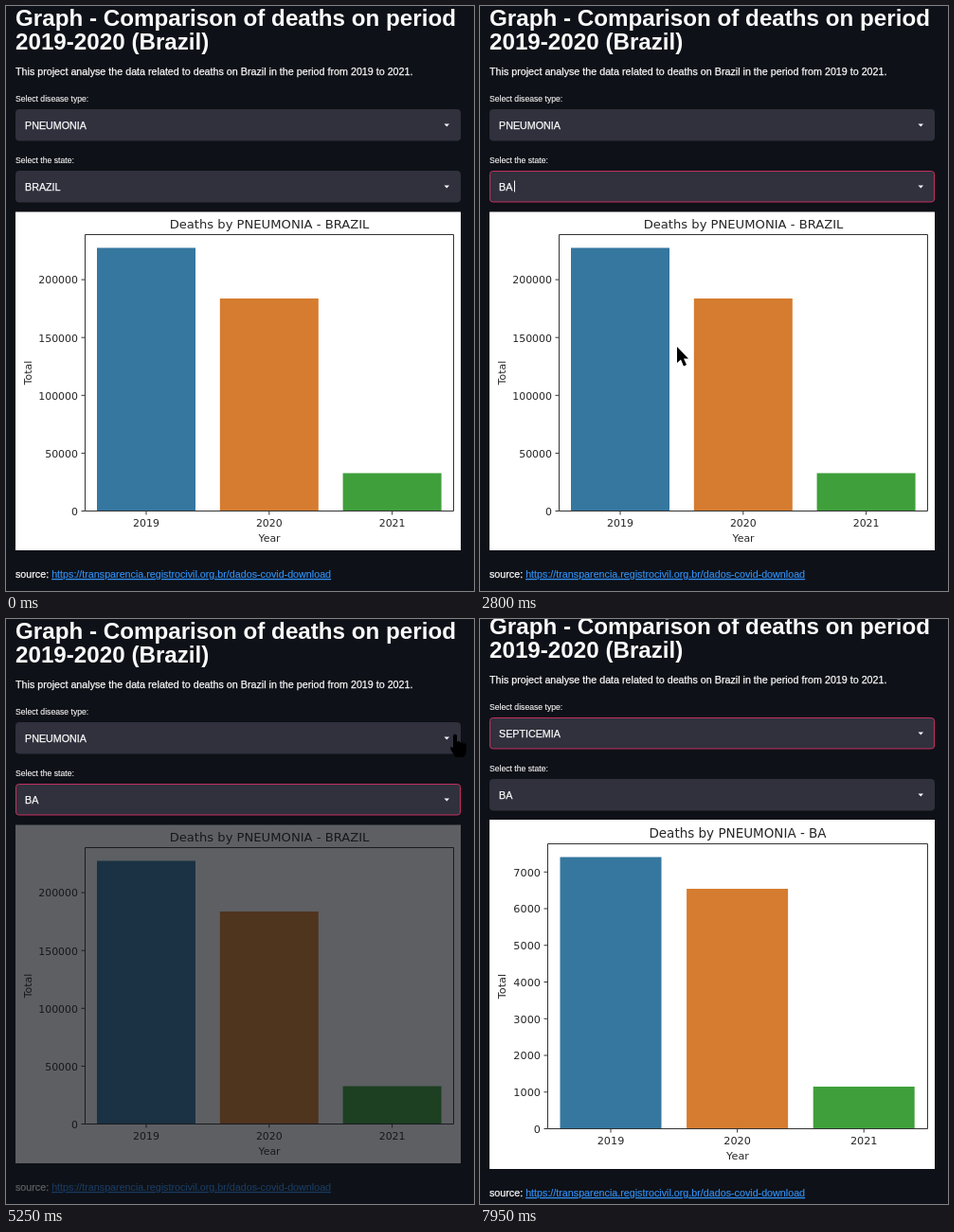
Animation, 494 px wide and 618 px high, one loop 8000 ms. Source, as an HTML page:

```html
<!DOCTYPE html>
<html lang="en">
<head>
<meta charset="utf-8">
<title>Comparison of deaths</title>
<style>
html, body { margin: 0; width: 100%; height: 100%; overflow: hidden; background: #0e1117; }
svg { display: block; width: 494px; height: 618px; }
.ui { font-family: "Liberation Sans", Arial, sans-serif; font-size: 10.73px; fill: #fafafa; }
.ui text { stroke: #fafafa; stroke-width: .25px; }
.ui .title { font-size: 24.2px; font-weight: bold; stroke: none; }
.ui .label { font-size: 8.63px; stroke-width: .1px; }
.ui .link { fill: #3391f5; stroke: #3391f5; stroke-width: .15px; text-decoration: underline; }
.plot { font-family: "DejaVu Sans", sans-serif; fill: #262626; }
.axis { fill: none; stroke: #333; stroke-width: 1; }
</style>
</head>
<body>
<svg viewBox="0 0 494 618">
  <g id="page" class="ui">
    <text class="title" x="10" y="21">Graph - Comparison of deaths on period</text>
    <text class="title" x="10" y="46">2019-2020 (Brazil)</text>
    <text x="10" y="73">This project analyse the data related to deaths on Brazil in the period from 2019 to 2021.</text>
    <text class="label" x="10" y="101">Select disease type:</text>
    <g id="disease" transform="translate(10 109)"></g>
    <text class="label" x="10" y="165.5">Select the state:</text>
    <g id="state" transform="translate(10 174)"></g>
  </g>
  <g id="result">
    <g id="country" class="plot"></g>
    <g id="region" class="plot"></g>
    <g id="source" class="ui">
      <text x="10" y="604">source: <tspan class="link">https://transparencia.registrocivil.org.br/dados-covid-download</tspan></text>
    </g>
  </g>
  <g id="cursor">
    <path id="arrow" d="M0 0V17L4 13.5L7 20.5L10 19L7 12.5H12Z"/>
    <path id="hand" d="M-2 1Q0-2 2 1V8Q4 6 5.5 8.5Q8 7 9 9.5Q12 8.500 12 12V17Q12 21 9 24H0Q-2 20-4.500 16Q-6 12-2 14Z"/>
  </g>
</svg>
<script>
const LOOP = 8000;
const SWAP = 5300;
const BLINK = 700;
const COLORS = ["#35779f", "#d57c30", "#3f9f3b"];
const $ = id => document.getElementById(id);

function makeSelect(id) {
  const g = $(id);
  g.innerHTML = `<rect x=".5" y=".5" width="469" height="32.5" rx="3" fill="#30313d"/>
    <text x="10" y="20.500"></text>
    <path d="M452.500 15.500h5.500l-2.750 3z"/>
    <path d="M26.500 10.500v12" stroke="#fafafa"/>`;
  const [box, text, , caret] = g.children;
  return (value, focused, caretOn) => {
    text.textContent = value;
    box.setAttribute("stroke", focused ? "#c42f61" : "#30313d");
    caret.setAttribute("opacity", caretOn ? 1 : 0);
    caret.setAttribute("transform", `translate(${text.getComputedTextLength() - 14.3} 0)`);
  };
}

function drawChart(id, c) {
  const { left, top, bottom, size } = c;
  const right = 472.5, mid = (left + right) / 2;
  const text = (x, y, s, anchor = "middle", extra = "") =>
    `<text x="${x}" y="${y}" text-anchor="${anchor}" ${extra}>${s}</text>`;
  let out = `<rect x="10" y="${c.panel[0]}" width="470" height="${c.panel[1] - c.panel[0]}" fill="#fff"/>`;
  let ticks = "";
  c.tops.forEach((y, i) => {
    const x = c.first + i * c.gap;
    out += `<rect x="${x - c.width / 2}" y="${y}" width="${c.width}" height="${bottom - y}" fill="${COLORS[i]}"/>`;
    out += text(x, bottom + 16.5, 2019 + i);
    ticks += `M${x} ${bottom}v4`;
  });
  for (let i = 0; i <= c.count; i++) {
    const y = bottom - i * c.rise;
    out += text(left - 7.5, y + 4.3, i * c.step, "end");
    ticks += `M${left} ${y}h-4`;
  }
  out += `<path class="axis" d="M${left} ${top}H${right}V${bottom}H${left}Z${ticks}"/>`;
  out += text(mid, top - 6.5, c.title, "middle", `font-size="${size * 1.2}"`);
  out += text(mid, bottom + 32, "Year");
  const cy = (top + bottom) / 2;
  out += text(27, cy, "Total", "middle", `transform="rotate(-90 27 ${cy})"`);
  $(id).setAttribute("font-size", size);
  $(id).innerHTML = out;
}

drawChart("country", {
  title: "Deaths by PNEUMONIA - BRAZIL", panel: [217.5, 575],
  left: 83.5, top: 241.5, bottom: 533.5, size: 10.95,
  first: 148, gap: 129.8, width: 104, tops: [255.5, 309, 493.5],
  count: 4, step: 50000, rise: 61.1
});
drawChart("region", {
  title: "Deaths by PNEUMONIA - BA", panel: [212, 581],
  left: 71.5, top: 237.5, bottom: 538.5, size: 11.25,
  first: 138, gap: 133.6, width: 107, tops: [251.5, 285, 494],
  count: 7, step: 1000, rise: 38.75
});

const setDisease = makeSelect("disease");
const setState = makeSelect("state");

// time, x, y of the pointer tip
const PATH = [
  [900, 510, 150], [1250, 412, 210], [1900, 300, 190], [2150, 300, 190],
  [2650, 208, 360], [2850, 208, 360], [3400, 474, 122], [5500, 474, 122],
  [5900, 496, 110], [6100, 474, 117], [6300, 474, 117], [6700, 260, 215],
  [6890, 260, 215], [7250, 510, 200]
];

function pointerAt(t) {
  const i = PATH.findIndex(k => k[0] > t);
  if (i <= 0) return [510, 150];
  const [a, b] = [PATH[i - 1], PATH[i]];
  const u = (t - a[0]) / (b[0] - a[0]);
  const e = u * u * (3 - 2 * u);
  return [a[1] + (b[1] - a[1]) * e, a[2] + (b[2] - a[2]) * e];
}

// cubic-bezier(.42, 0, 1, 1)
function easeIn(x) {
  if (x <= 0) return 0;
  if (x >= 1) return 1;
  let lo = 0, hi = 1;
  for (let i = 0; i < 20; i++) {
    const s = (lo + hi) / 2;
    const bx = 1.26 * s * (1 - s) ** 2 + 3 * s * s * (1 - s) + s ** 3;
    if (bx < x) lo = s; else hi = s;
  }
  return lo * lo * (3 - 2 * lo);
}

const blink = (t, start) => (t - start) % BLINK < BLINK / 2;

function render(t) {
  const swapped = t >= SWAP;
  const stateFocus = t >= 2060 && t < 6190;
  const diseaseFocus = t >= 6190;

  $("page").setAttribute("transform", `translate(0 ${swapped ? -5 : 0})`);
  $("source").setAttribute("transform", `translate(0 ${swapped ? 6 : 0})`);
  $("country").style.display = swapped ? "none" : "";
  $("region").style.display = swapped ? "" : "none";
  $("result").setAttribute("opacity", swapped ? 1 : 1 - 0.67 * easeIn((t - 4368) / 640));

  setState(t < 2700 ? "BRAZIL" : "BA", stateFocus, stateFocus && blink(t, 2060));
  setDisease(t < 6890 ? "PNEUMONIA" : "SEPTICEMIA", diseaseFocus, diseaseFocus && blink(t, 6190));

  const [x, y] = pointerAt(t);
  const overSelect = (y > 108 && y < 143) || (y > 173 && y < 208);
  $("cursor").setAttribute("transform", `translate(${x} ${y})`);
  $("arrow").style.display = overSelect ? "none" : "";
  $("hand").style.display = overSelect ? "" : "none";
}

const began = performance.now();
function tick() {
  render((performance.now() - began) % LOOP);
  requestAnimationFrame(tick);
}
tick();
</script>
</body>
</html>
```
